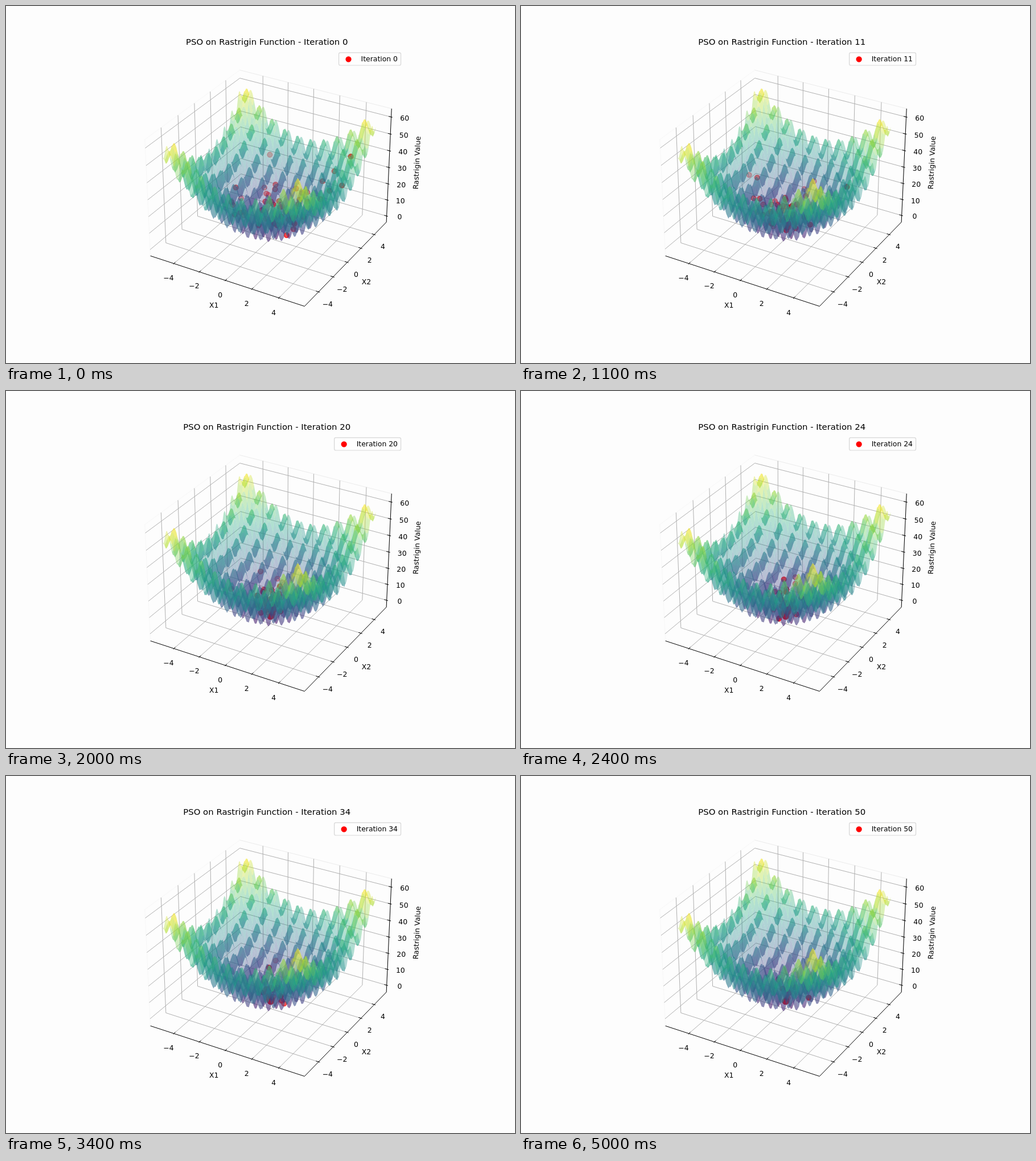
Recreate the animation shown at these times as an HTML page with a canvas. Size 894 by 626 pixels, loop 5100 ms.

```html
<!DOCTYPE html>
<html lang="en">
<head>
<meta charset="utf-8">
<title>Particle swarm</title>
<style>
  html, body { margin: 0; width: 100%; height: 100%; overflow: hidden; background: #fdfdfd; }
  canvas { display: block; }
</style>
</head>
<body>
<canvas id="stage" width="894" height="626"></canvas>
<script>
(() => {
const ctx = document.getElementById('stage').getContext('2d');
const STEP = 100, STEPS = 51;
const FONT = '"DejaVu Sans", sans-serif';
const SMALL = 12.417, LARGE = 14.9;

// Half sizes of the data box and of the slightly larger pane box
const HALF = 0.5714, HALF_Z = 0.4286;
const P = HALF * 25 / 24, PZ = HALF_Z * 25 / 24;
const TICK = HALF / 6, TICK_Z = HALF_Z / 6;
const DOMAIN = 5.12, LIMIT = DOMAIN * 1.1;

const VIRIDIS = ['440154', '482878', '3e4a89', '31688e', '26828e', '1f9e89', '35b779', '6ece58', 'b5de2b', 'fde725']
  .map(hex => [0, 2, 4].map(i => parseInt(hex.slice(i, i + 2), 16)));
const SURFACE_ALPHA = 0.36;

function viridis(t) {
  const p = Math.max(0, Math.min(1, t)) * 9, i = Math.min(8, Math.floor(p));
  const rgb = VIRIDIS[i].map((c, k) => Math.round(c + (VIRIDIS[i + 1][k] - c) * (p - i)));
  return `rgba(${rgb},${SURFACE_ALPHA})`;
}

const wave = x => x * x + 5 - 5 * Math.cos(2 * Math.PI * x);
const rastrigin = (x, y) => wave(x) + wave(y);

// Perspective camera: elevation 30, azimuth -60, distance 10
function project(x, y, z) {
  const depth = 10 - (0.4330 * x - 0.75 * y + 0.5 * z);
  const s = 2604.9 / depth;
  return {
    x: 464.7 + (0.8660 * x + 0.5 * y) * s,
    y: 309.5 - (-0.25 * x + 0.4330 * y + 0.8660 * z) * s,
    depth
  };
}

// Surface cells: outlines of 2x2 blocks on a 100x100 grid
const N = 100;
const axis = Array.from({ length: N }, (_, i) => -DOMAIN + 2 * DOMAIN * i / (N - 1));
const levels = axis.map(wave);
const peak = 2 * Math.max(...levels), floor = 2 * Math.min(...levels);
const cells = [];
for (let i = 0; i < N - 1; i += 2) for (let j = 0; j < N - 1; j += 2) {
  const a = Math.min(i + 2, N - 1), b = Math.min(j + 2, N - 1);
  const ring = [];
  for (let k = i; k < a; k++) ring.push([k, j]);
  for (let k = j; k < b; k++) ring.push([a, k]);
  for (let k = a; k > i; k--) ring.push([k, b]);
  for (let k = b; k > j; k--) ring.push([i, k]);
  const mean = ring.reduce((sum, [p, q]) => sum + levels[p] + levels[q], 0) / ring.length;
  cells.push({ ring, mean });
}
const means = cells.map(c => c.mean);
const low = Math.min(...means), high = Math.max(...means);
cells.forEach(c => { c.color = viridis((c.mean - low) / (high - low)); });

// The value axis grows downwards as the swarm finds lower points
function valueScale(iteration) {
  const min = iteration < 7 ? floor : floor * Math.pow(0.55, Math.floor((iteration - 1) / 4));
  const margin = (peak - min) * 0.05;
  const lo = min - margin, span = peak - min + 2 * margin;
  return z => ((z - lo) / span * 2 - 1) * HALF_Z;
}

const toBox = v => v / LIMIT * HALF;

function line(color, ...points) {
  ctx.beginPath();
  points.forEach(p => { const q = project(...p); ctx.lineTo(q.x, q.y); });
  ctx.strokeStyle = color;
  ctx.lineWidth = 1;
  ctx.stroke();
}

function text(str, x, y, size = SMALL, align = 'center') {
  ctx.font = `${size}px ${FONT}`;
  ctx.textAlign = align;
  ctx.fillStyle = '#000';
  ctx.fillText(str, x, y);
}

function tickLabel(value, ...pos) {
  const q = project(...pos);
  text(String(value).replace('-', '\u2212'), q.x, q.y + 9.4);
}

function drawAxes(zBox) {
  const grid = '#b0b0b0', black = '#000';
  const gap = TICK * 1.4224, gapZ = TICK_Z * 1.4224 / 2;
  const edge = P + gap / 2, base = -PZ - gapZ;
  const out = P + TICK * 0.1, inner = P - TICK * 0.2;
  const flat = [-4, -2, 0, 2, 4], tall = [0, 10, 20, 30, 40, 50, 60];

  line('#f7f7f7', [-P, -P, -PZ], [-P, -P, PZ], [-P, P, PZ]);
  line('#ececec', [-P, P, PZ], [P, P, PZ], [P, P, -PZ]);

  for (const v of flat) {
    const b = toBox(v);
    line(grid, [b, -P, -PZ], [b, P, -PZ], [b, P, PZ]);
    line(grid, [P, b, -PZ], [-P, b, -PZ], [-P, b, PZ]);
  }
  for (const v of tall) {
    const b = zBox(v);
    line(grid, [-P, -P, b], [-P, P, b], [P, P, b]);
  }

  line(black, [-P, -P, -PZ], [P, -P, -PZ]);
  line(black, [P, -P, -PZ], [P, P, -PZ]);
  line(black, [P, P, -PZ], [P, P, PZ]);

  for (const v of flat) {
    const b = toBox(v);
    line(black, [b, -out, -PZ], [b, -inner, -PZ]);
    line(black, [out, b, -PZ], [inner, b, -PZ]);
    tickLabel(v, b, -edge, base);
    tickLabel(v, edge, b, base);
  }
  for (const v of tall) {
    const b = zBox(v);
    line(black, [out, P, b], [inner, P, b]);
    tickLabel(v, edge, edge, b);
  }

  text('X1', 365.3, 528.6);
  text('X2', 632.9, 488);
  ctx.save();
  ctx.translate(722.3, 274.9);
  ctx.rotate(-87.4 * Math.PI / 180);
  text('Rastrigin Value', 0, 3.6);
  ctx.restore();
}

function drawSurface(zBox) {
  const grid = axis.map((x, i) => axis.map((y, j) => project(toBox(x), toBox(y), zBox(levels[i] + levels[j]))));
  cells.map(({ ring, color }) => {
    const points = ring.map(([i, j]) => grid[i][j]);
    return { points, color, depth: points.reduce((s, p) => s + p.depth, 0) / points.length };
  }).sort((a, b) => b.depth - a.depth).forEach(({ points, color }) => {
    ctx.beginPath();
    points.forEach(p => ctx.lineTo(p.x, p.y));
    ctx.fillStyle = color;
    ctx.fill();
  });
}

let seed = 7;
function random() {
  seed = (seed * 16807) % 2147483647;
  return seed / 2147483647;
}
const bell = () => random() + random() + random() - 1.5;

// Particle swarm search: one list of positions per iteration
function simulate(count) {
  const INERTIA = 0.72, PULL = 1.49;
  const swarm = Array.from({ length: count }, () => {
    const pos = [0.4 + 3.4 * bell(), 0.4 + 3.4 * bell()];
    return { pos, vel: [bell(), bell()], best: pos, value: rastrigin(...pos) };
  });
  return Array.from({ length: STEPS }, () => {
    const positions = swarm.map(p => p.pos);
    const leader = swarm.reduce((a, b) => b.value < a.value ? b : a).best;
    for (const p of swarm) {
      p.vel = p.vel.map((v, k) => INERTIA * v
        + PULL * random() * (p.best[k] - p.pos[k])
        + PULL * random() * (leader[k] - p.pos[k]));
      p.pos = p.pos.map((x, k) => Math.max(-DOMAIN, Math.min(DOMAIN, x + p.vel[k])));
      const value = rastrigin(...p.pos);
      if (value < p.value) Object.assign(p, { best: p.pos, value });
    }
    return positions;
  });
}
const history = simulate(50);

function dot(x, y, alpha) {
  ctx.beginPath();
  ctx.arc(x, y, 4.4, 0, 2 * Math.PI);
  ctx.fillStyle = ctx.strokeStyle = `rgba(255,0,0,${alpha})`;
  ctx.lineWidth = 1.5;
  ctx.fill();
  ctx.stroke();
}

// Far particles are fainter
function drawParticles(iteration, zBox) {
  const dots = history[iteration]
    .map(([x, y]) => project(toBox(x), toBox(y), zBox(rastrigin(x, y))))
    .sort((a, b) => b.depth - a.depth);
  const far = dots[0].depth, near = dots[dots.length - 1].depth;
  dots.forEach(p => dot(p.x, p.y, 1 - 0.7 * (p.depth - near) / (far - near || 1)));
}

function drawLegend(label) {
  ctx.font = `${SMALL}px ${FONT}`;
  const left = 688 - ctx.measureText(label).width;
  ctx.beginPath();
  ctx.roundRect(left - 39, 81.8, 732.5 - left, 22.2, 2.5);
  ctx.fillStyle = 'rgba(255,255,255,0.8)';
  ctx.fill();
  ctx.strokeStyle = 'rgba(204,204,204,0.8)';
  ctx.lineWidth = 1.2;
  ctx.stroke();
  dot(left - 22, 93.3, 1);
  text(label, left, 97.2, SMALL, 'left');
}

function draw(iteration) {
  const zBox = valueScale(iteration), label = `Iteration ${iteration}`;
  ctx.fillStyle = '#fdfdfd';
  ctx.fillRect(0, 0, 894, 626);
  drawAxes(zBox);
  drawParticles(iteration, zBox);
  drawSurface(zBox);
  text(`PSO on Rastrigin Function - ${label}`, 458.2, 67.8, LARGE);
  drawLegend(label);
}

const start = performance.now();
let shown = -1;
function tick() {
  const iteration = Math.floor((performance.now() - start) / STEP) % STEPS;
  if (iteration !== shown) draw(shown = iteration);
  requestAnimationFrame(tick);
}
tick();
})();
</script>
</body>
</html>
```
